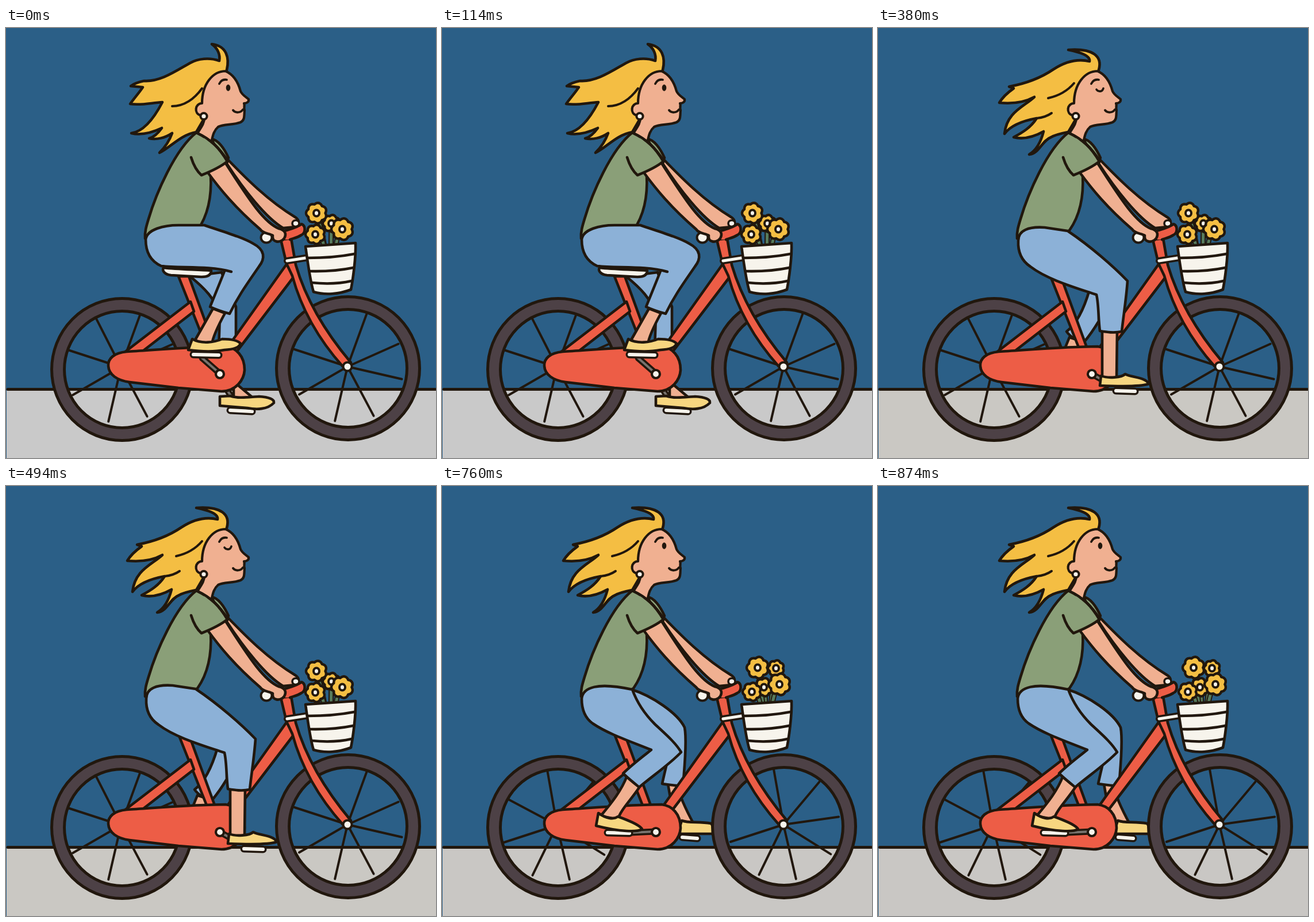
An HTML page with a canvas for the animation above (950 ms loop, 748 px wide and 748 px high).

```html
<!DOCTYPE html>
<html lang="en">
<head>
<meta charset="utf-8">
<title>Cyclist</title>
<style>
html, body { margin: 0; overflow: hidden; background: #2b5f87; }
canvas { display: block; }
</style>
</head>
<body>
<canvas id="stage" width="748" height="748"></canvas>
<script>
const ctx = document.getElementById('stage').getContext('2d');
const INK = '#21170d', RED = '#ed5d46', BLUE = '#8cb1d7', SKIN = '#f0b091', GREEN = '#8a9f78',
      YELLOW = '#f4be43', SHOE = '#f7d680', WHITE = '#f7f4ec', TYRE = '#4d4146', GREY = '#77736e';
const STEP = 190;

function shape(d, fill, width = 4.6) {
  const path = new Path2D(d);
  if (fill) { ctx.fillStyle = fill; ctx.fill(path); }
  if (width) { ctx.lineWidth = width; ctx.strokeStyle = INK; ctx.stroke(path); }
}
const line = (d, width) => shape(d, null, width);

function ellipse(x, y, rx, ry, fill, width = 4.6) {
  const path = new Path2D();
  path.ellipse(x, y, rx, ry, 0, 0, 7);
  shape(path, fill, width);
}

// A thick bar with an ink outline
function bar(d, color, width, outline = 7) {
  line(d, width + outline);
  ctx.strokeStyle = color;
  ctx.lineWidth = width;
  ctx.stroke(new Path2D(d));
}

// Hair, three shapes shared by the poses
const hairLow = {
  shape: 'M384 73C389 52 384 31 358 28C368 35 373 46 371 57C354 51 334 53 320 61C295 75 268 94 240 92C231 94 222 97 217 101L238 103C232 112 224 121 216 132C235 135 253 130 272 129C258 156 240 180 218 183C235 187 254 182 271 174C264 184 257 190 249 192C262 195 277 191 289 183C284 197 276 208 267 217C286 208 303 186 331 181L355 140Z',
  strands: 'M289 136C310 136 328 123 341 105'
};
const hairHigh = {
  shape: 'M386 73C400 54 402 25 384 18C391 38 389 56 377 66C356 51 336 50 315 60C292 73 274 93 237 91C248 100 262 100 272 97C252 112 226 105 202 136C226 131 244 136 262 134C240 151 220 153 210 175C234 168 254 173 274 168C258 180 243 186 227 189C248 195 268 191 289 181C285 196 276 210 259 213C286 213 298 178 341 164L355 140Z',
  strands: 'M272 122C282 118 291 112 297 106M262 134L272 130M274 168C284 166 295 160 302 152M289 181L299 168'
};
const hairBack = {
  shape: 'M384 73C391 49 374 35 331 38C351 42 370 48 368 58C343 52 322 61 305 72C280 89 255 97 228 102L236 105C226 112 217 120 211 130C231 132 252 131 272 120C254 137 224 146 220 184C232 168 254 161 276 157C266 173 251 182 236 190C252 194 270 190 288 180C284 196 276 212 263 220C280 219 285 196 301 190C310 185 321 183 331 181L355 140Z',
  strands: 'M296 122C314 118 330 109 341 96M276 157C286 156 295 153 302 148'
};

const posyLow = [[566, 340, 15], [540, 322, 18], [538, 359, 17], [585, 350, 19]];

// Five pedalling poses; the bike leans a little on every other one
const poses = [
  {
    ground: '#c9c9c9', hair: hairLow, flowers: posyLow, seat: true,
    spokes: [-70, -24, 13, 62, 103, 150, 198, 243],
    near: {
      crank: 'M341 574L373 602', pedal: 'M326 568L370 569',
      shin: 'M360 488L326 548L358 550C360 538 370 516 381 496Z',
      shoe: 'M317 560L324 541C340 550 362 547 376 541C391 541 403 543 408 549C405 557 394 559 380 560C360 564 340 563 317 560Z',
      pants: 'M392 424C352 413 305 418 270 414C250 405 243 387 243 368C245 350 275 343 300 343L345 343C380 355 411 364 430 375C451 386 451 401 440 415C423 440 405 464 389 497C378 494 366 490 355 485C363 465 371 446 380 423'
    },
    far: {
      pants: 'M320 432L375 425L400 485V560H370L372 500C365 472 345 452 320 432Z',
      shin: 'M396 644L396 615L428 642Z',
      shoe: 'M372 641L390 640C405 645 422 642 440 641C458 642 467 646 466 652C455 664 435 664 420 661L372 657Z',
      pedal: 'M390 665L428 667', crank: 'M386 632L405 661'
    }
  },
  {
    ground: '#d2d2d0', hair: hairHigh, seat: true, lean: true,
    flowers: [[530, 333, 18], [566, 322, 18], [548, 356, 18], [599, 350, 20]],
    spokes: [-100, -55, -14, 33, 75, 116, 168, 211],
    near: {
      crank: 'M398 567L371 602', pedal: 'M382 562L423 563',
      shin: 'M386 466L371 545H405L408 472Z',
      shoe: 'M366 556L368 537C382 544 404 541 412 533C425 541 455 537 459 546C455 554 435 554 420 554Z',
      pants: 'M398 411C360 417 310 416 275 417C250 410 240 390 242 368C243 350 262 343 290 344C340 345 395 352 425 365C438 370 440 385 435 405C428 435 420 455 411 473C399 473 386 469 376 464C384 445 391 430 398 411'
    },
    far: {
      pants: 'M318 432L372 418L390 435L384 548H368L367 472C352 462 336 449 318 432Z',
      shoe: 'M331 652L333 636L350 630L395 643C404 646 404 654 398 655Z',
      pedal: 'M335 652L369 658', crank: 'M361 632L355 648'
    }
  },
  {
    ground: '#cac8c3', hair: hairBack, flowers: posyLow, blink: true,
    spokes: [-70, -24, 13, 62, 103, 150, 198, 243],
    near: {
      crank: 'M372 602L390 612', pedal: 'M414 631L447 632',
      shin: 'M390 525V610L415 608L416 525Z',
      shoe: 'M386 622L388 605C400 610 424 608 430 602C440 608 465 607 471 619C460 623 430 624 386 622Z',
      pants: 'M244 370C244 352 262 345 290 347L330 353C370 380 410 415 434 440C432 470 427 500 424 528C410 531 398 529 386 527C383 505 384 480 380 464C345 452 295 438 265 415C250 405 243 390 244 370Z'
    },
    far: {
      shin: 'M333 538L322 565H352L348 543Z',
      pants: 'M368 455L385 460L384 510C375 525 368 535 358 547C348 545 335 538 328 528C345 515 358 490 368 455Z'
    }
  },
  {
    ground: '#c6c9ca', hair: hairHigh, lean: true,
    flowers: [[536, 329, 18], [570, 331, 17], [552, 357, 17], [600, 350, 19]],
    spokes: [-85, -41, 2, 48, 90, 134, 181, 226],
    near: {
      crank: 'M371 602L360 632', pedal: 'M322 655L357 657',
      shin: 'M331 543C326 570 318 600 314 628L346 630C342 600 350 575 357 552Z',
      shoe: 'M303 643L307 620C324 630 339 632 346 627C360 638 388 637 391 647C388 656 370 656 350 655Z',
      pants: 'M242 366C245 350 275 341 330 354C345 385 375 445 391 487C388 510 370 535 360 553C350 551 338 547 328 542C332 525 338 510 341 495C335 480 325 465 305 450C280 435 242 400 242 366Z'
    },
    far: {
      shin: 'M389 494L380 542H406L410 500Z',
      pedal: 'M407 561L427 562',
      shoe: 'M379 550L380 535C395 543 420 537 432 540C450 542 459 546 459 552C450 558 420 556 400 556Z',
      pants: 'M330 354C365 370 420 385 448 398C452 402 452 412 446 425C435 455 425 475 414 502C404 502 395 498 386 493C395 470 402 450 405 428C392 424 380 422 366 421Z'
    }
  },
  {
    ground: '#c9c7c4', hair: hairBack,
    flowers: [[581, 317, 14], [560, 350, 16], [549, 316, 19], [539, 358, 16], [587, 345, 19]],
    spokes: [-100, -50, -8, 32, 77, 116, 162, 208],
    near: {
      crank: 'M330 603L371 601', pedal: 'M288 603L326 604',
      shin: 'M322 504C312 530 296 550 276 574L306 580C310 564 329 546 344 523Z',
      shoe: 'M268 591L272 569C285 578 298 581 306 575C320 580 345 590 348 597C340 602 310 602 268 591Z',
      pants: 'M243 370C245 350 270 341 331 354C339 376 352 396 370 414C388 431 406 446 416 463C395 485 365 505 343 524C332 515 322 507 315 500C330 485 350 470 364 459C330 445 290 432 262 413C248 403 243 388 243 370Z'
    },
    far: {
      shin: 'M393 518L405 588H438C427 568 415 545 408 518Z',
      pedal: 'M418 611L444 613',
      shoe: 'M410 605L417 582C430 587 447 583 468 587L480 605Z',
      pants: 'M330 354C365 365 410 395 422 420C426 440 422 490 419 522C408 521 395 520 383 518C388 495 392 480 395 465L340 440Z'
    }
  }
];

function limb(leg) {
  if (leg.crank) bar(leg.crank, GREY, 4);
  if (leg.pedal) bar(leg.pedal, WHITE, 6);
  if (leg.shin) shape(leg.shin, SKIN);
  if (leg.shoe) shape(leg.shoe, SHOE);
  shape(leg.pants, BLUE);
}

function wheel(x, y, rx, ry, hubX, hubY, spokes) {
  for (const degrees of spokes) {
    const a = degrees * Math.PI / 180;
    line(`M${hubX} ${hubY}l${97 * Math.cos(a)} ${97 * Math.sin(a)}`, 4);
  }
  for (const [extra, color] of [[5, INK], [-5, TYRE]]) {
    ctx.beginPath();
    ctx.ellipse(x, y, rx - 11.5, ry - 11.5, 0, 0, 7);
    ctx.lineWidth = 22 + extra;
    ctx.strokeStyle = color;
    ctx.stroke();
  }
}

// Scalloped petals around a white eye
function flower(x, y, r) {
  const path = new Path2D();
  for (let i = 0; i < 84; i++) {
    const a = i * Math.PI / 42, d = r * (.86 + .14 * Math.abs(Math.sin(3.5 * a)));
    path.lineTo(x + d * Math.cos(a), y + d * Math.sin(a));
  }
  path.closePath();
  shape(path, YELLOW, 4.4);
  ellipse(x, y, 5, 5.5, WHITE, 4);
}

function bike(pose) {
  const rear = pose.lean ? [200, 596.5, 121, 124] : [202, 594, 123, 124];
  const front = pose.lean ? [597.5, 592.5, 123, 122] : [595, 592, 125, 125];
  wheel(...rear, 200, 590, pose.spokes);
  wheel(...front, 594, 589, pose.lean ? pose.spokes : pose.spokes.slice(0, -1));
  shape('M300 432L350 558H364L318 432Z', RED);
  shape('M321 476L205 565H234L327 493Z', RED);
  shape('M488 411L385 556L402 562L502 431Z', RED);
  shape('M478 368L496 366L504 412C521 470 552 525 600 582L586 589C544 542 514 490 498 431L488 410Z', RED);
  ellipse(594, 589, 7.5, 7.5, WHITE, 4);
  shape('M210 563C188 565 177 575 178 588C179 603 193 613 215 616L300 626L375 632C400 632 414 612 415 595C415 570 400 556 382 554C330 554 260 560 210 563Z', RED);
  if (pose.seat) shape('M274 417C300 420 330 420 357 422C357 430 350 433 340 433L287 430C276 429 271 422 274 417Z', WHITE);
}

function basket(pose) {
  for (const [x, y] of pose.flowers) {
    bar(`M${x} ${y}Q${x * .6 + 226} 355 ${x * .4 + 339} 384`, '#587b5c', 5, 4);
  }
  pose.flowers.forEach(f => flower(...f));
  bar('M489 405L521 400', WHITE, 5);
  const shift = pose.lean ? 2 : 0;
  shape(`M${521 + shift} 380L${608 - shift} ${374 + shift}C609 400 603 440 600 455C580 463 555 465 ${535 + shift / 2} 459C529 440 525 410 ${521 + shift} 380Z`, WHITE);
  line('M524 400Q570 400 606 393M528 423Q570 424 604 417M532 443Q570 447 601 440');
}

function head(pose) {
  shape(pose.hair.shape, YELLOW);
  line(pose.hair.strands, 4);
  shape('M382 75C396 81 404 95 408 110C411 117 418 120 422 124C423 129 418 131 414 131C416 136 413 138 415 143C414 152 416 160 408 164C395 169 379 167 369 172C362 178 360 186 358 195L352 199L333 183C340 172 345 166 345 156L339 152C326 149 329 131 341 131C341 97 360 75 382 75Z', SKIN, 4.2);
  ellipse(344, 153.5, 5.6, 5.6, WHITE, 4);
  line('M395 143C399 148 408 148 412 142', 4);
  line('M371 97C374 91 379 89 384 90', 3.8);
  if (pose.blink) line('M380 107C383 111 390 112 392 105', 3.6);
  else ellipse(386.5, 104, 3.8, 5.8, INK, 0);
}

function draw(pose) {
  ctx.fillStyle = '#2b5f87';
  ctx.fillRect(0, 0, 748, 748);
  ctx.fillStyle = pose.ground;
  ctx.fillRect(1, 628, 747, 120);
  line('M3 628.5H750', 5);

  limb(pose.far);
  bike(pose);

  // Far arm and handlebar
  shape('M386 229C415 259 455 300 503 329C511 334 511 343 503 346L482 348C452 330 414 282 384 236Z', SKIN);
  ellipse(504, 340, 6, 5.5, WHITE, 3.6);
  shape('M478 368L484 353C497 349 507 347 514 341C522 344 521 357 514 360C505 366 498 366 494 368', RED);
  shape('M357 193C369 194 380 210 387 226L380 234Z', GREEN);

  head(pose);
  shape('M331 182C294 211 261 288 248 332C244 345 241 355 242 366L300 375L333 352C352 325 358 290 356 255L385 230C372 210 358 195 331 182Z', GREEN);

  limb(pose.near);
  ellipse(372, 602, 7, 7, WHITE, 4.2);

  // Near arm and sleeve
  ellipse(453, 364.5, 9.5, 9, WHITE, 4);
  shape('M350 250C372 280 398 312 442 350C447 358 458 357 464 361C462 373 477 375 484 366C489 357 484 351 475 349C450 339 426 304 380 232Z', SKIN);
  shape('M322 225L340 256L385 232L345 190Z', GREEN, 0);
  line('M322 225C326 238 332 249 340 256C355 250 373 242 385 232C372 210 358 194 331 182');

  basket(pose);
}

ctx.lineJoin = ctx.lineCap = 'round';
function tick() {
  draw(poses[Math.floor(performance.now() / STEP) % poses.length]);
  requestAnimationFrame(tick);
}
tick();
</script>
</body>
</html>
```
